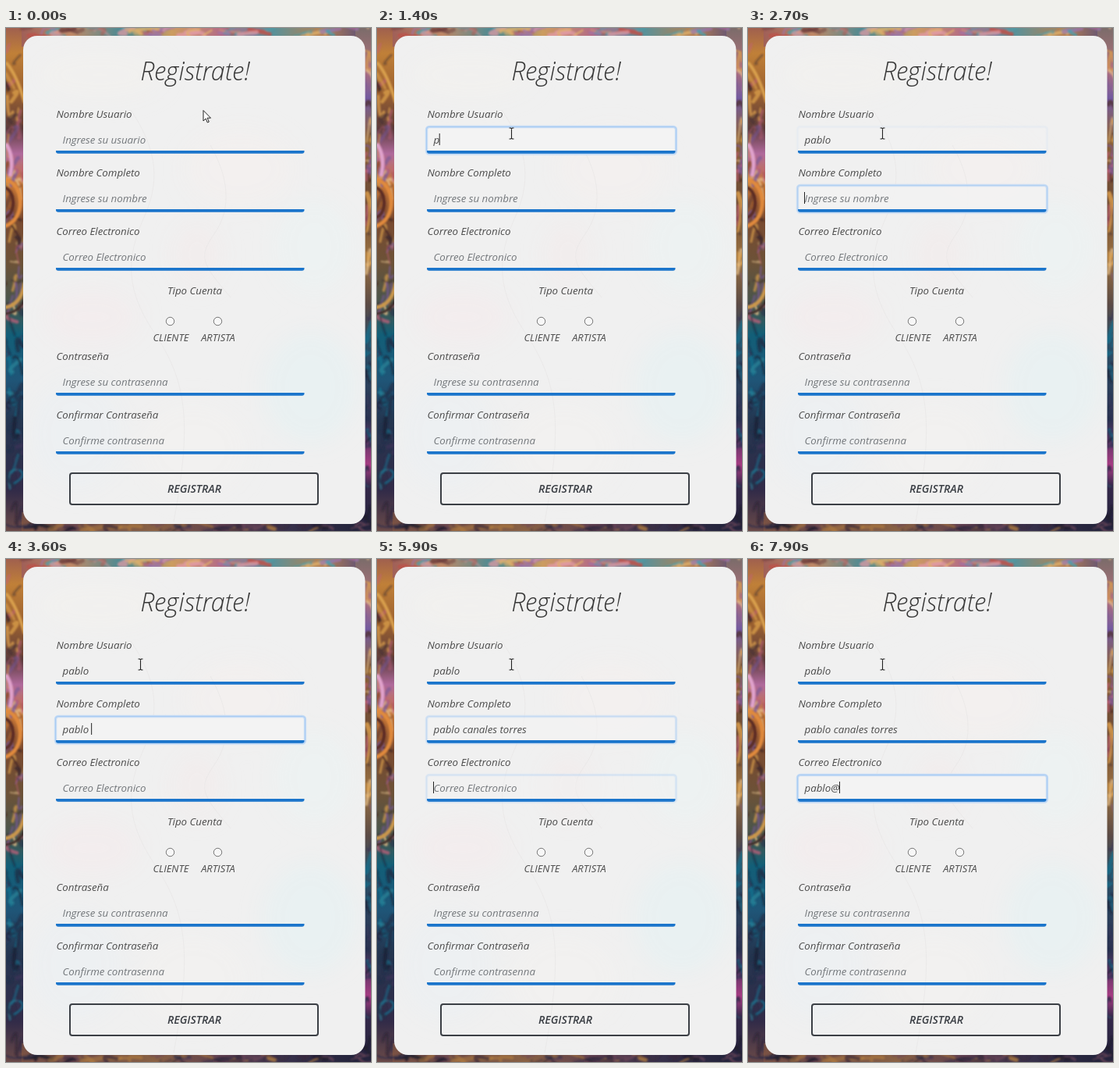
Write an HTML page that moves like this. It is 468 px wide and 644 px high and loops after 8 s.

```html
<!DOCTYPE html>
<html lang="es">
<head>
<meta charset="utf-8">
<title>Registro</title>
<style>
html, body { margin: 0; width: 100%; height: 100%; overflow: hidden; }
svg { display: block; width: 468px; height: 644px; }
text { font: italic 400 13.3px "Open Sans", "Noto Sans", sans-serif; fill: #4c4c4c; white-space: pre; }
.title { font-size: 32.3px; font-weight: 300; fill: #383838; }
.option { font-size: 12.9px; }
.button { font-size: 14.1px; font-weight: 600; fill: #3b3f45; }
.hint { fill: #74787c; }
.mid { text-anchor: middle; }
</style>
</head>
<body>
<svg viewBox="0 0 468 644">
  <defs>
    <linearGradient id="left" x1="0" y1="0" x2="0" y2="1">
      <stop offset="0" stop-color="#a0604e"/>
      <stop offset=".05" stop-color="#c08038"/>
      <stop offset=".13" stop-color="#9a6030"/>
      <stop offset=".2" stop-color="#5c3c3c"/>
      <stop offset=".25" stop-color="#b06a9c"/>
      <stop offset=".31" stop-color="#c87838"/>
      <stop offset=".38" stop-color="#7a4a30"/>
      <stop offset=".47" stop-color="#6b5238"/>
      <stop offset=".56" stop-color="#42564f"/>
      <stop offset=".61" stop-color="#125f78"/>
      <stop offset=".7" stop-color="#1f5577"/>
      <stop offset=".78" stop-color="#243650"/>
      <stop offset=".92" stop-color="#322b48"/>
      <stop offset="1" stop-color="#6a4a48"/>
    </linearGradient>
    <linearGradient id="right" x1="0" y1="0" x2="0" y2="1">
      <stop offset="0" stop-color="#7b6c6a"/>
      <stop offset=".08" stop-color="#b0707c"/>
      <stop offset=".14" stop-color="#735aa0"/>
      <stop offset=".22" stop-color="#8d6337"/>
      <stop offset=".34" stop-color="#6d4a35"/>
      <stop offset=".46" stop-color="#9a7040"/>
      <stop offset=".55" stop-color="#5a4a45"/>
      <stop offset=".63" stop-color="#2b5068"/>
      <stop offset=".78" stop-color="#2a3150"/>
      <stop offset=".87" stop-color="#a83c84"/>
      <stop offset=".91" stop-color="#34284a"/>
      <stop offset="1" stop-color="#24243c"/>
    </linearGradient>
    <linearGradient id="top">
      <stop offset="0" stop-color="#a06058"/>
      <stop offset=".15" stop-color="#c08a68"/>
      <stop offset=".3" stop-color="#4a8a94"/>
      <stop offset=".45" stop-color="#cc9c60"/>
      <stop offset=".6" stop-color="#b46c86"/>
      <stop offset=".75" stop-color="#56929c"/>
      <stop offset=".9" stop-color="#b98050"/>
      <stop offset="1" stop-color="#6e5a70"/>
    </linearGradient>
    <linearGradient id="low">
      <stop offset="0" stop-color="#7a5244"/>
      <stop offset=".2" stop-color="#6c4a48"/>
      <stop offset=".4" stop-color="#8a6244"/>
      <stop offset=".6" stop-color="#5d3f4e"/>
      <stop offset=".8" stop-color="#37304a"/>
      <stop offset="1" stop-color="#24243c"/>
    </linearGradient>
    <filter id="soft" x="-20%" y="-20%" width="140%" height="140%"><feGaussianBlur stdDeviation=".8"/></filter>
    <filter id="haze" x="-50%" y="-50%" width="200%" height="200%"><feGaussianBlur stdDeviation="14"/></filter>
    <clipPath id="inside"><rect x="22" y="10" width="438.5" height="625" rx="18"/></clipPath>
  </defs>

  <rect width="234" height="644" fill="url(#left)"/>
  <rect x="234" width="234" height="644" fill="url(#right)"/>
  <rect x="20" width="428" height="24" fill="url(#top)"/>
  <rect x="20" y="620" width="428" height="24" fill="url(#low)"/>
  <g id="paint" fill="none" stroke-linecap="round" filter="url(#soft)"></g>
  <g fill="none" filter="url(#soft)">
    <path d="M-2 194C24 198 26 246 -2 254" stroke="#e08a3c" stroke-width="5"/>
    <path d="M-2 204C12 208 14 238 -2 243" stroke="#5a2c24" stroke-width="4"/>
    <path d="M-2 358C12 356 21 346 24 326" stroke="#c9974c" stroke-width="5"/>
    <path d="M-2 366C14 364 22 356 26 342" stroke="#3a2a26" stroke-width="3"/>
    <path d="M0 44Q14 60 24 96" stroke="#d9a04e" stroke-width="4"/>
    <path d="M0 148Q11 166 5 190" stroke="#e0a2cc" stroke-width="5"/>
    <path d="M462 210Q470 235 462 262" stroke="#c99048" stroke-width="3"/>
  </g>

  <rect x="22" y="10" width="438.5" height="625" rx="18" fill="#f0f0f0"/>
  <g clip-path="url(#inside)">
    <g id="tints" filter="url(#haze)"></g>
    <g fill="none" stroke="#e6e4e4" opacity=".6">
      <path d="M160 105C190 150 200 190 178 240S150 330 190 390S240 500 215 632"/>
      <path d="M262 150C285 190 290 230 268 262S250 300 288 345"/>
    </g>
  </g>

  <text class="title mid" x="242.5" y="67">Registrate!</text>
  <g id="form"></g>
  <text class="mid" x="242" y="341">Tipo Cuenta</text>
  <g fill="#f7f7f7" stroke="#707070">
    <circle cx="210.5" cy="375.5" r="5.2"/>
    <circle cx="271.5" cy="375.5" r="5.2"/>
  </g>
  <text class="option mid" x="211.5" y="401">CLIENTE</text>
  <text class="option mid" x="272" y="401">ARTISTA</text>
  <rect x="82" y="570" width="318" height="40" rx="3" fill="none" stroke="#3b3f45" stroke-width="2"/>
  <text class="button mid" x="241.5" y="595">REGISTRAR</text>

  <rect id="caret" width="1" height="15" fill="#222"/>
  <path id="arrow" d="M.5 .5V14l3.1-3 2.2 5 2-.9-2.2-4.9h4.4z" fill="#fff" stroke="#222"/>
  <path id="beam" d="M-3-7h2l1 1 1-1h2M0-6V6M-3 7h2l1-1 1 1h2" fill="none" stroke="#222" stroke-width="1.1"/>
</svg>
<script>
const LOOP = 8000, STEP = 100, FADE = 150;
const $ = id => document.getElementById(id);
const clamp = v => Math.max(0, Math.min(1, v));

function add(parent, tag, attrs, text = "") {
  const el = document.createElementNS("http://www.w3.org/2000/svg", tag);
  for (const k in attrs) el.setAttribute(k, attrs[k]);
  el.textContent = text;
  parent.append(el);
  return el;
}

let seed = 11;
const rnd = () => (seed = seed * 16807 % 2147483647) / 2147483647;
const span = r => (rnd() * 2 - 1) * r;
const pick = list => list[Math.floor(rnd() * list.length)];

// Painted backdrop of curved strokes: warm above, blue below
const warm = ["#dca04c", "#4a2a24", "#c0607a", "#e6c08c", "#8a4a2c", "#7a5a9a", "#3c2a30"];
const cool = ["#14708e", "#20304a", "#3a3358", "#2a8298", "#1b2238"];
const edge = ["#e09aa4", "#4aa0ac", "#e0b06a", "#6a3c3c", "#9a74b0", "#c05048"];
const base = ["#b07c40", "#3a2a3c", "#6a4658", "#2c2c4a", "#1f1c2c"];
function dab(x, y, colors, w, h) {
  add($("paint"), "path", {
    d: `M${x} ${y}q${span(w)} ${span(h)} ${span(w)} ${span(h)}`,
    stroke: pick(colors), "stroke-width": 1.5 + rnd() * 4, opacity: .4 + rnd() * .45
  });
}
for (let i = 0; i < 130; i++) {
  const y = rnd() * 644;
  dab(i % 3 ? rnd() * 22 : 461 + rnd() * 7, y, y < 365 ? warm : y < 590 ? cool : base, 12, 28);
}
for (let i = 0; i < 110; i++) {
  const up = i % 2;
  dab(10 + rnd() * 445, up ? rnd() * 9 : 636 + rnd() * 8, up ? edge : base, 26, 8);
}

// Pale colours showing through the card
[[390, 460, 60, 70, "#e6f1f3"], [395, 280, 50, 60, "#ebf2f3"], [110, 370, 60, 35, "#f4ebed"],
 [90, 520, 60, 70, "#ebf0f2"], [300, 180, 70, 50, "#f4f0ee"], [245, 290, 30, 40, "#f2ecec"],
 [120, 60, 80, 30, "#f3f1ee"], [240, 540, 70, 60, "#f3f1f0"]
].forEach(([cx, cy, rx, ry, fill]) => add($("tints"), "ellipse", { cx, cy, rx, ry, fill, opacity: .7 }));

const fields = [
  { y: 115, label: "Nombre Usuario", hint: "Ingrese su usuario", from: 370, to: 2570,
    value: "pablo", keys: [1400, 1600, 1800, 2000, 2200] },
  { y: 190, label: "Nombre Completo", hint: "Ingrese su nombre", from: 2570, to: 5840,
    value: "pablo canales torres",
    keys: [2900, 3000, 3200, 3300, 3500, 3600, 3800, 4000, 4200, 4400,
           4500, 4700, 4800, 4900, 5000, 5100, 5200, 5400, 5500, 5700] },
  { y: 265, label: "Correo Electronico", hint: "Correo Electronico", from: 5840, to: 1e9,
    value: "pablo@", keys: [6300, 6500, 6800, 7000, 7300, 7800] },
  { y: 425, label: "Contraseña", hint: "Ingrese su contrasenna" },
  { y: 500, label: "Confirmar Contraseña", hint: "Confirme contrasenna" }
];

for (const f of fields) {
  const g = add($("form"), "g", { transform: `translate(64 ${f.y})` });
  add(g, "text", { x: .5 }, f.label);
  f.ring = add(g, "g", { opacity: 0 });
  add(f.ring, "rect", { x: -.5, y: 11.5, width: 320, height: 34.5, rx: 3.5, fill: "#f3f3f3",
    stroke: "#c6dcf5", "stroke-width": 3.4 });
  add(f.ring, "rect", { x: -.5, y: 11.5, width: 320, height: 34, rx: 3, fill: "none", stroke: "#a9cbf2" });
  add(g, "path", { d: "M0 42H318.5V43Q318.5 45.8 315.5 45.8H3Q0 45.8 0 43Z", fill: "#1b75cb" });
  f.text = add(g, "text", { x: 8.5, y: 32.5, class: "hint" }, f.hint);
}

function draw(ms) {
  const t = Math.floor(ms / STEP) * STEP;
  let caret = null;
  for (const f of fields) {
    if (!f.keys) continue;
    const n = f.keys.filter(k => k <= t).length;
    f.text.textContent = n ? f.value.slice(0, n) : f.hint;
    f.text.setAttribute("class", n ? "" : "hint");
    f.ring.setAttribute("opacity", clamp((t - f.from) / FADE) - clamp((t - f.to) / FADE));
    if (t >= f.from && t < f.to) {
      const last = n ? f.keys[n - 1] : f.from;
      if ((t - last) % 1000 < 500) caret = { f, n };
    }
  }
  $("caret").setAttribute("visibility", caret ? "visible" : "hidden");
  if (caret) {
    const w = caret.n ? caret.f.text.getComputedTextLength() : 0;
    $("caret").setAttribute("x", 72 + w);
    $("caret").setAttribute("y", caret.f.y + 20);
  }

  const p = clamp(t / 300), e = p * p * (3 - 2 * p);
  const x = 252.5 - 80 * e, y = 105 + 30 * e, over = y > 126;
  $("arrow").setAttribute("visibility", over ? "hidden" : "visible");
  $("beam").setAttribute("visibility", over ? "visible" : "hidden");
  $(over ? "beam" : "arrow").setAttribute("transform", `translate(${x} ${y})`);
}

const start = performance.now();
function tick() {
  draw((performance.now() - start) % LOOP);
  requestAnimationFrame(tick);
}
tick();
</script>
</body>
</html>
```
